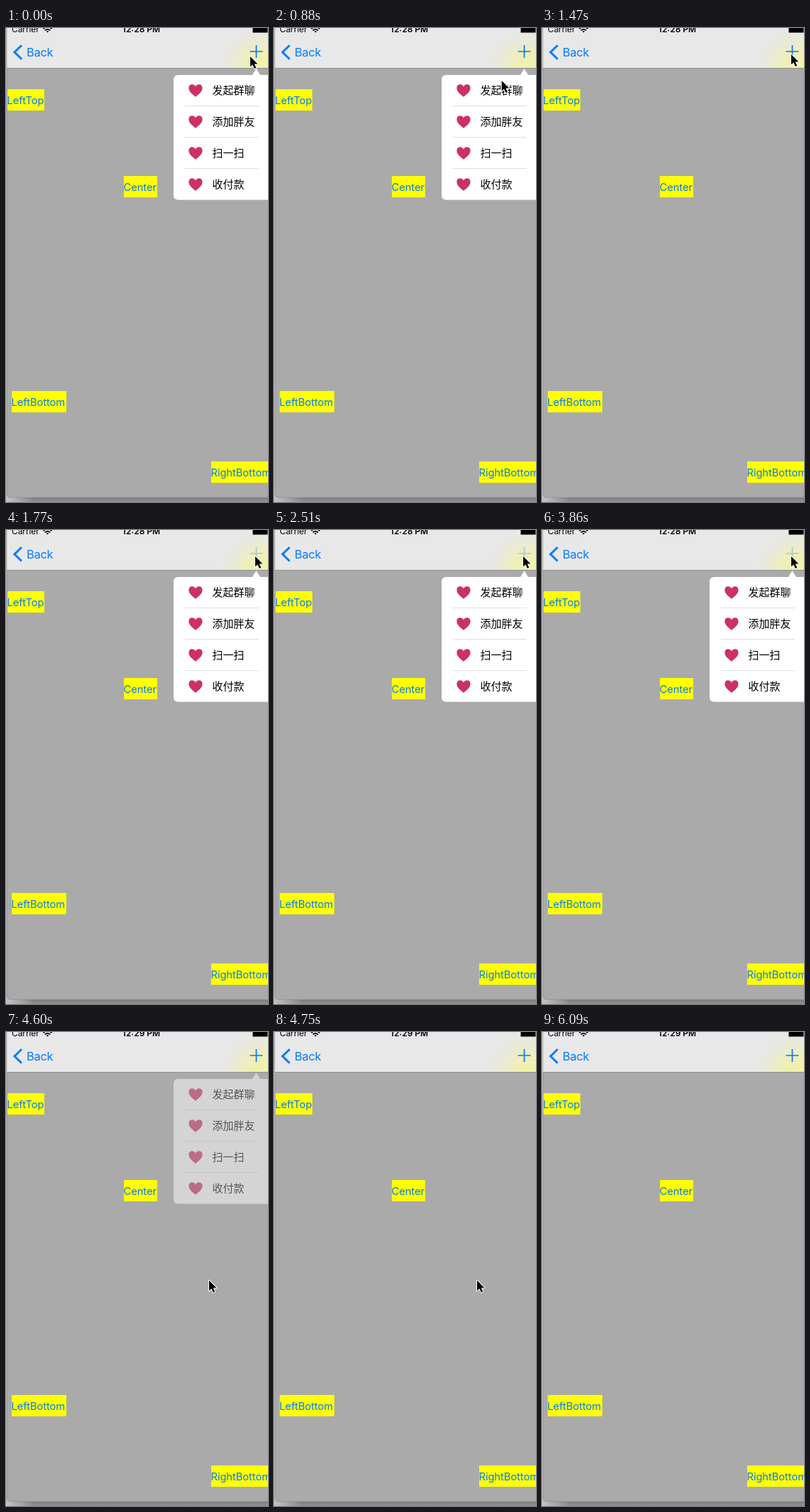
These frames come from a looping animation (369x666 px, 6.37 s). An HTML page:

```html
<!DOCTYPE html>
<html lang="zh">
<head>
<meta charset="utf-8">
<title>Popover menu</title>
<style>
html, body { margin: 0; width: 100%; height: 100%; overflow: hidden; background: #aaa; }
svg { display: block; width: 369px; height: 666px; }
text { font-family: Inter, Roboto, "Liberation Sans", sans-serif; }
.tag { font-size: 14.7px; letter-spacing: -.05px; fill: #007aff; }
.item { font-family: "Noto Sans CJK SC", "Noto Sans CJK", "Noto Sans CJK JP", sans-serif; font-size: 15px; }
</style>
</head>
<body>
<svg viewBox="0 0 369 666">
  <defs>
    <radialGradient id="glow" gradientUnits="userSpaceOnUse" cx="0" cy="0" r="1"
      gradientTransform="translate(362 56) scale(66 60)">
      <stop offset="0" stop-color="#f3f3a2"/>
      <stop offset=".4" stop-color="#f0f0b0" stop-opacity=".8"/>
      <stop offset="1" stop-color="#e8e8dc" stop-opacity="0"/>
    </radialGradient>
    <linearGradient id="shade" x1="0" y1="0" x2="0" y2="1">
      <stop offset="0" stop-color="#7c7c7c"/>
      <stop offset="1" stop-color="#929292"/>
    </linearGradient>
    <linearGradient id="edge">
      <stop offset="0" stop-color="#c4c4c4"/>
      <stop offset="1" stop-color="#c4c4c4" stop-opacity="0"/>
    </linearGradient>
    <path id="heart" d="M0 9C-4 5.8-9.6 2-9.6-3.4C-9.6-6.5-7.5-8.4-4.9-8.4C-2.7-8.4-.9-7.2 0-5.2C.9-7.2 2.7-8.4 4.9-8.4C7.5-8.4 9.6-6.5 9.6-3.4C9.6 2 4 5.8 0 9Z" fill="#cd3063"/>
  </defs>

  <rect width="369" height="660" fill="#bdbdbd"/>
  <rect y="660" width="369" height="6" fill="url(#shade)"/>
  <rect y="660" width="40" height="6" fill="url(#edge)"/>
  <path d="M1 0H369V660H7Q1 660 1 654Z" fill="#aaa"/>
  <path d="M1.5 57V654Q1.5 659.5 7 659.5H369" fill="none" stroke="#989898"/>

  <rect x="1.5" width="368" height="56" fill="#e8e8e8"/>
  <rect x="290" width="79" height="56" fill="url(#glow)"/>
  <path d="M1 56.5H369" stroke="#929292"/>
  <text x="8" y="6.2" font-size="12" letter-spacing="-.1">Carrier</text>
  <g fill="none" stroke="#000" stroke-width="1.7">
    <path d="M52.5 1.2Q58.5-4 64.5 1.2M54.8 3.5Q58.5 .3 62.2 3.5"/>
    <path d="M58.5 6.5L56.8 4.7Q58.5 3.5 60.2 4.7Z" fill="#000" stroke="none"/>
  </g>
  <text id="clock" x="190.5" y="6.2" font-size="12" font-weight="600" text-anchor="middle"></text>
  <rect x="347.5" width="21" height="6.5"/>
  <path d="M22 24.2L12 34L22 43.8" fill="none" stroke="#007aff" stroke-width="3"/>
  <text x="29" y="40" font-size="16.5" letter-spacing="-.3" fill="#007aff">Back</text>
  <path id="plus" d="M343.5 33H361.5M352.5 24V42" stroke="#007aff" stroke-width="1.7"/>

  <g id="tags"></g>
  <g id="menu">
    <path d="M236 73Q236 66 243 66H347L352.5 57L358 66H369V241.5H243Q236 241.5 236 234.5Z" fill="#fff"/>
  </g>
  <path id="cursor" d="M0 0V14.5L3.3 11.5L5.9 17L8.3 15.9L5.8 10.5H10.5Z"
    stroke="#fff" stroke-width="2" stroke-linejoin="round" paint-order="stroke"/>
</svg>
<script>
const LOOP = 6370;
const STEP = 148.3;   // the picture is held for one step at a time
const LEAD = 14;
const CLOCK_TURN = 28;
const EXIT = 41;

const $ = id => document.getElementById(id);

function add(parent, name, attrs, text = "") {
  const el = document.createElementNS("http://www.w3.org/2000/svg", name);
  for (const key in attrs) el.setAttribute(key, attrs[key]);
  el.textContent = text;
  parent.append(el);
}

function addTag(label, x, y, width) {
  add($("tags"), "rect", { x, y, width, height: 30, fill: "#ff0" });
  add($("tags"), "text", { class: "tag", x: x - 0.5, y: y + 20.5 }, label);
}
addTag("LeftTop", 2, 86, 52);
addTag("Center", 166, 208, 47);
addTag("LeftBottom", 8, 510, 77);
addTag("RightBottom", 289, 609, 88);

["发起群聊", "添加胖友", "扫一扫", "收付款"].forEach((label, i) => {
  const y = 88 + 44 * i;
  add($("menu"), "use", { href: "#heart", x: 267, y: y - 0.3 });
  add($("menu"), "text", { class: "item", x: 290.5, y: y + 5 }, label);
  if (i < 3) add($("menu"), "path", { d: `M252 ${y + 21.5}H356`, stroke: "#dedede" });
});

const home = [344, 40], item = [310, 87], button = [351, 37], rest = [286, 349], below = [349, 650];
const moves = [
  { start: 0, end: 4, from: home, to: item },
  { start: 5, end: 8, from: item, to: button },
  { start: 27, end: 29, from: button, to: rest },
  { start: 36, end: EXIT, from: rest, to: below }
];
const visits = [
  { open: 0, close: 9 }, { open: 12, close: 13 },
  { open: 17, close: 18 }, { open: 26, close: 31 }
];

const ease = p => p * p * (3 - 2 * p);
const latest = (list, key, n) => list.findLast(entry => entry[key] <= n);

function pointerAt(n) {
  const { start, end, from, to } = latest(moves, "start", n);
  const p = ease(Math.min(1, (n - start) / (end - start)));
  return from.map((v, i) => v + (to[i] - v) * p);
}

function draw(t) {
  const n = Math.floor((t + LEAD) / STEP);
  const { open, close } = latest(visits, "open", n);
  const pressed = n === open && open > 0;
  $("menu").setAttribute("opacity", n < close ? 1 : n === close ? 0.5 : 0);
  $("plus").setAttribute("opacity", pressed ? 0.3 : 1);
  $("cursor").setAttribute("visibility", n < EXIT ? "visible" : "hidden");
  $("cursor").setAttribute("transform", `translate(${pointerAt(n)})`);
  $("clock").textContent = n < CLOCK_TURN ? "12:28 PM" : "12:29 PM";
}

const begin = performance.now();
function tick() {
  draw((performance.now() - begin) % LOOP);
  requestAnimationFrame(tick);
}
tick();
</script>
</body>
</html>
```
